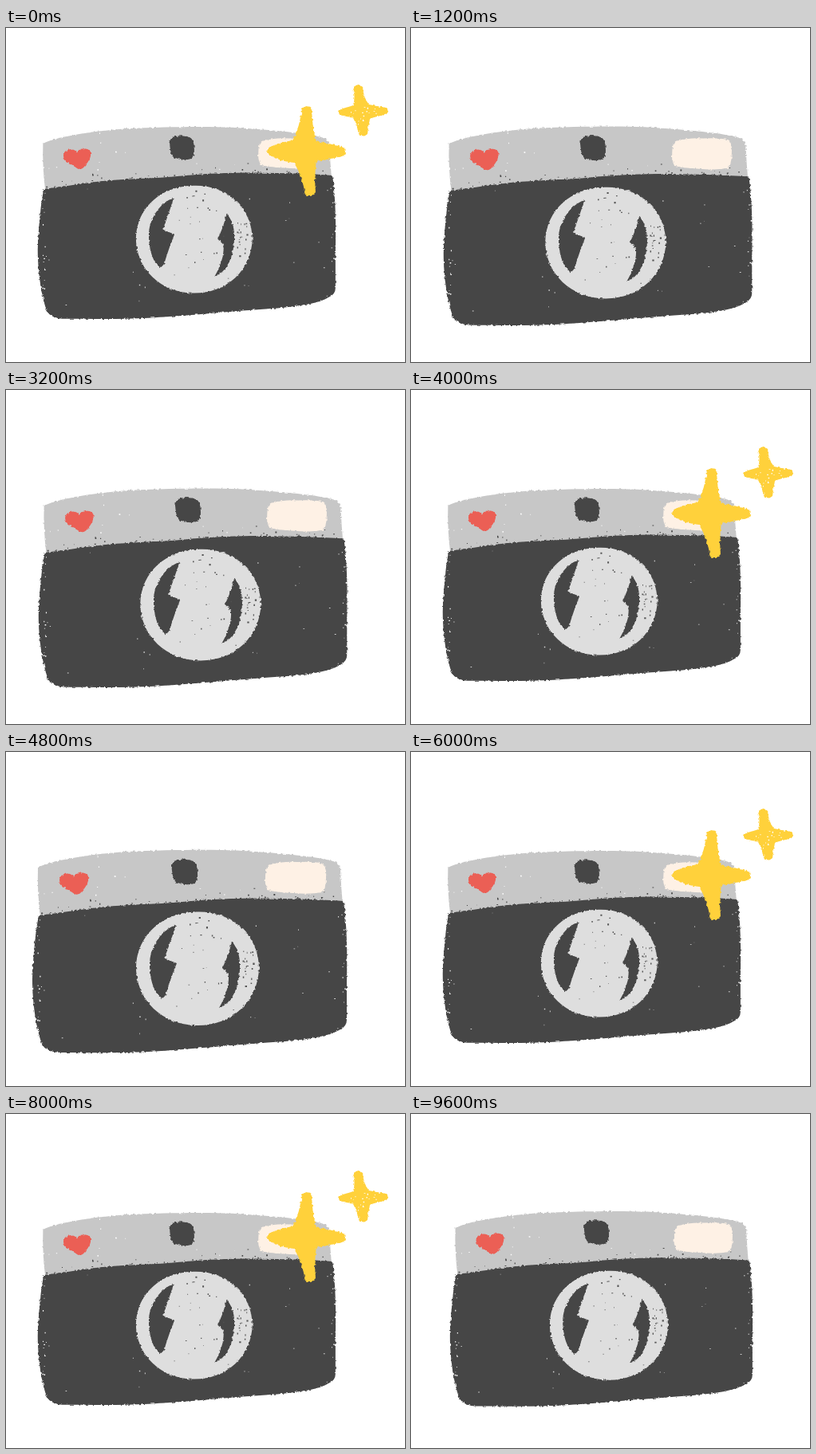
These frames come from a looping animation (500x419 px, 10000 ms). An HTML page:

```html
<!DOCTYPE html>
<html lang="en">
<head>
<meta charset="utf-8">
<title>Camera flash</title>
<style>
  html, body { margin: 0; width: 100%; height: 100%; overflow: hidden; background: #fff; }
  svg { display: block; width: 100vw; height: 100vh; }
</style>
</head>
<body>
<svg viewBox="0 0 500 419">
  <defs>
    <filter id="rough" color-interpolation-filters="sRGB">
      <feTurbulence type="fractalNoise" baseFrequency="0.3" numOctaves="2" seed="7"/>
      <feDisplacementMap in="SourceGraphic" scale="3.5" xChannelSelector="R" yChannelSelector="G"/>
    </filter>
  </defs>
  <g id="camera">
    <path filter="url(#rough)" fill="#c7c7c7" d="M40 145 C56 136 100 129 150 125 C200 123 250 122 290 123.500 C330 126 385 130 410 137 Q419 140 419 147 Q420 170 422 192 L230 205 L43 207 Q39 175 40 145Z"/>
    <path filter="url(#rough)" fill="#464646" d="M41 205 C75 201 95 197 125 194 C160 191 190 191 215 188.500 C255 184.500 285 183.500 320 183.500 C360 184 395 185 423 187 C427 215 428 250 427 290 L427 336 Q427 344 419 348 C405 357 380 360 350 363 C290 367 230 373 180 376 C140 378 100 377 70 377 Q50 377 45 366 C38 347 33 315 33 285 C34 255 37 225 41 205Z"/>
    <g id="bandDots"></g>
    <g id="bodyDots"></g>
    <path filter="url(#rough)" fill="#dedede" d="M239 200.500 C284 199 317 231 317 271 C316 313 283 343 240 343 C196 343 163 311 163 270 C164 230 196 201 239 200.500Z"/>
    <g filter="url(#rough)" fill="#464646">
      <path d="M213 217 C194 223 180 246 180 266 C180 286 186 303 195 309 Q199 308 201 302 Q206 285 214 265 L201 260 Q198 258 201 252 Q207 236 213 217Z"/>
      <path d="M283 238 C291 246 294 259 293 273 C292 295 283 316 267 321 Q274 309 278 294 Q280 281 278 278 L271 271 Q278 258 283 238Z"/>
      <path d="M210 137 Q222 132 235 137 Q240 140 240 151 Q241 161 236 165 Q226 168 214 164 Q209 161 208 149 Q207 141 210 137Z"/>
    </g>
    <path filter="url(#rough)" fill="#fef1e5" d="M329 142 Q345 137 365 138 Q386 137 397 140 Q402 144 401 158 Q401 171 397 176 Q380 179 360 177 Q338 176 328 173 Q324 166 325 157 Q325 146 329 142Z"/>
    <path filter="url(#rough)" fill="#eb5f55" d="M85 157 C82 150 67 151 67 161 C67 169 79 173 85 177.500 Q91 180.500 95 175 C100 169 104 164 103 156 C101 150 88 150 85 157Z"/>
    <g id="lensDots"></g>
  </g>
  <g id="sparkles">
    <g filter="url(#rough)" fill="#ffd13b">
      <path d="M371 101 Q377 95 383 101 Q384 128 389 142 Q408 145 423 150 Q430 157 421 161 Q405 165 389 167 Q386 185 388 207 Q382 214 375 209 Q371 185 361 169 Q342 167 330 159 Q324 154 331 149 Q345 143 359 141 Q368 125 371 101Z"/>
      <path d="M435 75 Q441 68 447 74 Q448 88 455 96 Q465 98 476 100 Q482 105 475 109 Q463 111 456 114 Q454 124 453 133 Q447 138 442 133 Q440 122 435 113 Q427 111 419 109 Q414 105 421 101 Q430 99 435 97 Q438 87 435 75Z"/>
    </g>
    <g id="starDots"></g>
  </g>
</svg>
<script>
const STEP = 400;
// scale, x, y of the camera in each step; sparkles show on the first
const poses = [
  [0.947, 8.5, 7.8],
  [0.97, 4, 3.6],
  [1, 0, 0],
  [0.981, 8.4, 3],
  [0.962, 17.1, 3.8]
];
const byId = id => document.getElementById(id);
const camera = byId("camera"), sparkles = byId("sparkles");

let seed = 41;
function rand() {
  seed = (seed * 16807) % 2147483647;
  return seed / 2147483647;
}
const between = (a, b) => a + (b - a) * rand();

// Chalk specks: place() returns the centre of each one
function spatter(id, count, color, size, place) {
  let d = "";
  for (let i = 0; i < count; i++) {
    const [x, y] = place(), w = between(0.6, size), h = between(0.6, size);
    d += `M${x.toFixed(1)} ${y.toFixed(1)}h${w.toFixed(1)}v${h.toFixed(1)}h${(-w).toFixed(1)}z`;
  }
  byId(id).insertAdjacentHTML("beforeend", `<path fill="${color}" d="${d}"/>`);
}

const seam = x => 183 + 21 * Math.pow(Math.max(0, 320 - x) / 278, 1.6);

spatter("bandDots", 44, "#464646", 2, () => {
  const x = between(44, 418);
  return [x, seam(x) - 1 - 12 * Math.pow(rand(), 2.5)];
});
spatter("bandDots", 14, "#fff", 1.8, () => [between(46, 320), between(128, 180)]);
spatter("bodyDots", 24, "#d8d8d8", 1.8, () => [between(45, 422), between(200, 362)]);
spatter("bodyDots", 16, "#fff", 1.8, () => [between(39, 44), between(205, 350)]);
spatter("bodyDots", 12, "#fff", 2, () => [between(421, 427), between(200, 340)]);
spatter("lensDots", 14, "#565656", 2.4, () => [between(216, 272), between(206, 250)]);
spatter("lensDots", 20, "#565656", 2.6, () => [between(295, 310), between(246, 300)]);
spatter("lensDots", 14, "#565656", 1.8, () => [between(212, 285), between(245, 332)]);
spatter("starDots", 11, "#fff", 2, () => [between(424, 466), between(99, 108)]);
spatter("starDots", 7, "#fff", 1.8, () => [between(441, 450), between(108, 130)]);

function draw(time) {
  const step = Math.floor(time / STEP) % poses.length;
  const [s, x, y] = poses[step];
  camera.setAttribute("transform", `translate(${x} ${y}) scale(${s})`);
  sparkles.setAttribute("visibility", step === 0 ? "visible" : "hidden");
}

function tick() {
  draw(performance.now());
  requestAnimationFrame(tick);
}
tick();
</script>
</body>
</html>
```
